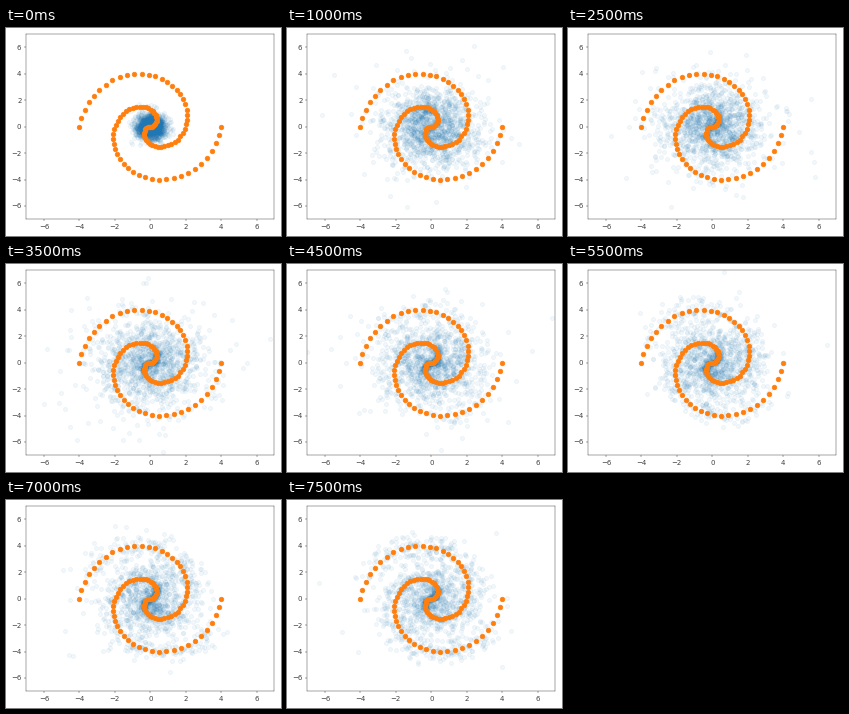
Animation of 275x208 px, one loop 8000 ms. Source, as a matplotlib script:

```python
import matplotlib.pyplot as plt
import numpy as np
from matplotlib.animation import FuncAnimation

W, H, DPI = 275, 208, 50
FRAMES, INTERVAL = 16, 500
POINTS = 1500


def spiral(t):
    """One arm, scaled so that both axes reach 4."""
    return np.column_stack([4 * t * np.cos(t) / (2 * np.pi),
                            4 * t * np.sin(t) / 4.814])


def ramp(step, start, end):
    return np.clip((step - start) / (end - start), 0, 1)


def samples(step):
    """Generated points at one training step."""
    rng = np.random.default_rng(100 + step)

    def near_arms(longest, noise, n):
        t = rng.uniform(0, longest, n)
        side = rng.choice([-1, 1], (n, 1))
        return side * spiral(t) + rng.normal(0, noise, (n, 2))

    # the blob opens at once, then gathers in the middle and along the arms
    spread = 0.42 + ramp(step, 0, 1) * (0.85 + 0.1 * ramp(step, 1, 4))
    core = 0.14 * ramp(step, 2, 7)
    arms = 0.8 * ramp(step, 5, 15)
    far = ramp(step, 0, 2) * (0.03 + 0.12 * np.exp(-((step - 7) / 2) ** 2))

    pts = rng.normal(0, spread, (POINTS, 2)) * [1, 1.15]
    n_far, n_core, n_arms = (int(POINTS * s)
                             for s in (far, core, arms * (1 - core - far)))
    wide, middle, along = np.split(pts[:n_far + n_core + n_arms],
                                   [n_far, n_far + n_core])
    wide[:] = rng.normal(0, 2.4, wide.shape)
    middle[:] = near_arms(1.1, 0.1, n_core)
    along[:] = near_arms(5.9, 0.55, n_arms)
    return pts


fig = plt.figure(figsize=(W / DPI, H / DPI), dpi=DPI, facecolor="white")
left, right, top, bottom = 20.3, 268.3, 6.2, 191.2
ax = fig.add_axes([left / W, 1 - bottom / H,
                   (right - left) / W, (bottom - top) / H])
ax.set(xlim=(-7, 7), ylim=(-7, 7),
       xticks=range(-6, 7, 2), yticks=range(-6, 7, 2))
ax.tick_params(width=0.5, labelcolor="0.25")
ax.spines[:].set_linewidth(0.5)

cloud = ax.scatter([], [], color="tab:blue", alpha=0.06)
arm = spiral(np.linspace(0, 2 * np.pi, 50))
ax.scatter(*np.vstack([arm, -arm]).T, s=44, color="tab:orange")


def update(step):
    cloud.set_offsets(samples(step))
    return [cloud]


anim = FuncAnimation(fig, update, frames=FRAMES, interval=INTERVAL,
                     repeat=True, repeat_delay=0)
plt.show()
```
